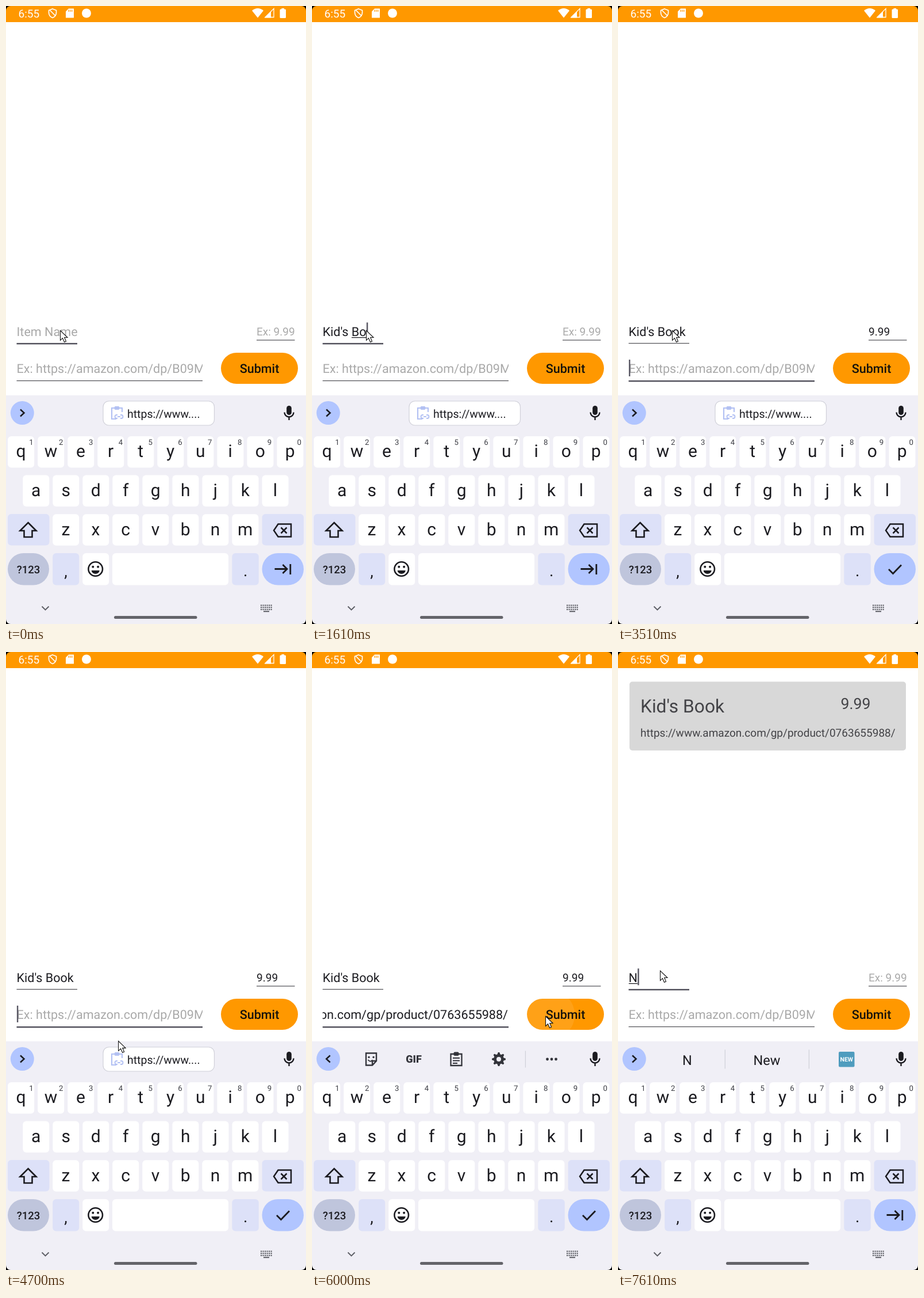
Recreate the animation shown at these times as an HTML page with a canvas. Size 522x1073 px, loop 8 s.

```html
<!DOCTYPE html>
<html lang="en">
<head>
<meta charset="utf-8">
<title>Wish list form</title>
<style>
html, body { margin: 0; width: 100%; height: 100%; overflow: hidden; background: #fff; }
canvas { display: block; width: 522px; height: 1073px; }
</style>
</head>
<body>
<canvas id="stage" width="522" height="1073"></canvas>
<script>
const c = document.getElementById('stage').getContext('2d');
const LOOP = 8000;
const INK = '#1b1b20', HINT = '#a9a9a9', ORANGE = '#ff9800', BLUE = '#b1c5ff', PALE = '#dde1f8';
const LINK = 'https://www.amazon.com/gp/product/0763655988/';
const BIG = 21.57, SMALL = 19.03;

// Time from which each value holds.
const NAME = [[0, ''], [810, 'K'], [910, 'Ki'], [1010, 'Kid'], [1110, "Kid'"], [1210, "Kid's"],
  [1310, "Kid's "], [1510, "Kid's B"], [1610, "Kid's Bo"], [1680, "Kid's Boo"],
  [1820, "Kid's Book"], [6070, ''], [7540, 'N']];
const PRICE = [[0, ''], [2830, '9'], [3100, '9.'], [3300, '9.9'], [3370, '9.99'], [6070, '']];
const URL_TEXT = [[0, ''], [5000, LINK], [6070, '']];
const FOCUS = [[0, 'name'], [1960, 'price'], [3510, 'url'], [6710, 'name']];
const BLINK = [[0, 0], [70, 1], [610, 0], [810, 1], [2430, 0], [2830, 1], [4010, 0], [4510, 1],
  [5500, 0], [6010, 1], [6500, 0], [6710, 1], [7210, 0], [7540, 1]];
const STRIP = [[0, 'chip'], [5000, 'tools'], [7540, 'words']];
const MOUSE = [[0, 94, 563], [3780, 94, 563], [3910, 432, 491], [4100, 414, 564], [4440, 414, 564],
  [4700, 195, 675], [4920, 222, 693], [5310, 222, 693], [5820, 406, 632], [6150, 406, 632],
  [6420, 100, 542], [6550, 73, 553]];

const clamp = v => Math.max(0, Math.min(1, v));
const at = (list, t) => list.filter(e => e[0] <= t).pop()[1];

function mouseAt(t) {
  const i = MOUSE.findIndex(k => k[0] > t);
  if (i < 0) return MOUSE[MOUSE.length - 1].slice(1);
  const [t0, x0, y0] = MOUSE[i - 1], [t1, x1, y1] = MOUSE[i];
  const p = (t - t0) / (t1 - t0);
  return [x0 + (x1 - x0) * p, y0 + (y1 - y0) * p];
}

function rect(x, y, w, h, fill, r = 0) {
  c.beginPath();
  c.roundRect(x, y, w, h, r);
  c.fillStyle = fill;
  c.fill();
}

function dot(x, y, r, fill) {
  c.beginPath();
  c.arc(x, y, r, 0, 7);
  c.fillStyle = fill;
  c.fill();
}

function text(s, x, y, size, fill = INK, align = 'left', weight = 400) {
  c.font = `${weight} ${size}px Roboto, sans-serif`;
  c.textAlign = align;
  c.fillStyle = fill;
  c.fillText(s, x, y);
}

function line(d, color = INK, width = 2.6, fill) {
  const p = new Path2D(d);
  if (fill) { c.fillStyle = fill; c.fill(p); }
  c.strokeStyle = color;
  c.lineWidth = width;
  c.stroke(p);
}

function shape(d, fill) {
  c.fillStyle = fill;
  c.fill(new Path2D(d));
}

function statusBar() {
  rect(0, 0, 522, 28, ORANGE);
  text('6:55', 21.5, 19.5, SMALL, '#fff');
  line('M81 5L87.500 7.500V12Q87 18 81 20.500Q75 18 74.500 12V7.500ZM76 7L86 17', '#fff', 1.7);
  shape('M109 4.500H118V20.500H104V9.500Z', '#fff');
  for (let i = 0; i < 3; i++) rect(108.500 + i * 2.800, 6.500, 1.300, 3.500, ORANGE);
  dot(140, 12.5, 8, '#fff');
  shape('M438 20.500L428 8Q438 0 448 8Z', '#fff');
  line('M451 19.500L466 4.500V19.500Z', '#fff', 1.3);
  shape('M450 20.500L461 9.500V20.500Z', '#fff');
  rect(476.5, 5.500, 10.500, 15.500, '#fff', 1.5);
  rect(479.5, 4, 4.500, 2, '#fff');
}

function card(t) {
  c.globalAlpha = t < 6070 ? 0 : clamp((t - 6010) / 120);
  rect(20, 51.5, 481, 119.5, '#d8d8d8', 5);
  text("Kid's Book", 39, 104.5, 31.72, '#434347');
  text('9.99', 387.5, 99, 26.64, '#434347');
  text(LINK, 39, 147, SMALL, '#434347');
  c.globalAlpha = 1;
}

// One line edit box: hint or value, underline, caret.
function field(f, value, focus, caret) {
  rect(f.x, f.line, f.w, focus ? 2.5 : 1.3, focus ? '#55545f' : '#55555a');
  c.save();
  c.beginPath();
  c.rect(f.x, f.base - 30, f.w, 42);
  c.clip();
  c.font = `400 ${f.size}px Roboto, sans-serif`;
  const width = c.measureText(value).width;
  const x = f.x - Math.max(0, width - f.w + 1);
  text(value || f.hint, x, f.base, f.size, value ? INK : HINT);
  if (f.compose && focus && value) {
    const start = value.lastIndexOf(' ') + 1;
    const left = x + c.measureText(value.slice(0, start)).width;
    rect(left, f.base + 2, x + width - left, 1.3, INK);
  }
  if (focus && caret) rect(Math.min(x + width + 0.3, f.x + f.w - 2.5), f.top, 2.5, f.tall, '#5a5965');
  c.restore();
}

const nameBox = { x: 18.5, w: 105.5, base: 573, line: 585, top: 549.5, tall: 29, size: BIG, hint: 'Item Name', compose: true };
const priceBox = { x: 436, w: 66.5, base: 572, line: 579.5, top: 551, tall: 26, size: SMALL, hint: 'Ex: 9.99' };
const urlBox = { x: 18.5, w: 323.5, base: 637, line: 650, top: 614, tall: 29, size: BIG, hint: 'Ex: https://amazon.com/dp/B09M' };

function form(t) {
  const focus = at(FOCUS, t), caret = at(BLINK, t);
  field(nameBox, at(NAME, t), focus === 'name', caret);
  field(priceBox, at(PRICE, t), focus === 'price', caret);
  field(urlBox, at(URL_TEXT, t), focus === 'url', caret);
  rect(374, 602, 134, 54, ORANGE, 27);
  if (t > 5930 && t < 6750) {
    c.save();
    c.clip();
    c.globalAlpha = 0.09 * clamp((6750 - t) / 350);
    dot(407 + 34 * clamp((t - 5930) / 320), 630, 15 + 125 * clamp((t - 5930) / 320), '#fff');
    c.restore();
  }
  text('Submit', 441, 637, BIG, '#15120c', 'center', 500);
}

function clipboard(x, y, color) {
  line(`M${x} ${y}h19v20h-19z`, color, 2.3);
  rect(x + 5, y - 3.5, 9, 6.5, color, 2);
}

function gear(x, y) {
  c.beginPath();
  for (let i = 0; i < 32; i++) {
    const r = i % 4 < 2 ? 12 : 8.8, a = (i - 0.5) * Math.PI / 16;
    c.lineTo(x + r * Math.cos(a), y + r * Math.sin(a));
  }
  c.fillStyle = '#33343b';
  c.fill();
  dot(x, y, 4, '#f0eff6');
}

function strip(mode) {
  const grey = '#33343b', rule = '#cfd0d8';
  dot(28.3, 706.5, 20.5, BLUE);
  line(mode === 'tools' ? 'M31.500 700.500L25 706.500L31.500 712.500' : 'M25 700.500L31.500 706.500L25 712.500', INK, 2.5);
  if (mode === 'chip') {
    rect(169, 686, 193.5, 42, '#fff', 10);
    c.strokeStyle = '#d0d0d9';
    c.lineWidth = 1.2;
    c.stroke();
    line('M192 717H184V698H202V705', '#b3c1f3', 2.2);
    rect(188.5, 695, 9, 6, '#b3c1f3', 2);
    line('M194 710H192.500A3 3 0 0 0 192.500 716H194M199 710H200.500A3 3 0 0 1 200.500 716H199M194 713H199', '#b3c1f3', 1.8);
    text('https://www....', 211, 715, 19.5);
  } else if (mode === 'tools') {
    line('M94 696.500H112V710L105 717.500H94ZM112 710H105V717', grey, 2.4);
    dot(99, 703.5, 1.7, grey);
    dot(107, 703.5, 1.7, grey);
    line('M97.500 708Q101.500 713 105.500 708.500', grey, 2);
    text('GIF', 177, 713, 18, grey, 'center', 900);
    clipboard(241.5, 698, grey);
    line('M245 705h12M245 709.500h12M245 714h8', grey, 1.8);
    gear(325, 707);
    rect(370.8, 692.5, 1.2, 29, rule);
    for (let i = 0; i < 3; i++) dot(409.5 + i * 7.5, 707, 2.4, grey);
  } else {
    text('N', 120.5, 716.5, 23.5, INK, 'center');
    text('New', 259, 716.5, 23.5, INK, 'center');
    rect(185.7, 690.5, 1.2, 33, rule);
    rect(331.8, 690.5, 1.2, 33, rule);
    rect(384, 694, 27.5, 26.5, '#4f9cbe', 2);
    text('NEW', 397.8, 711, 10.5, '#fff', 'center', 700);
  }
  rect(488.2, 694, 8.6, 16, INK, 4.3);
  line('M484.500 705.500A8 8 0 0 0 500.500 705.500M492.500 713.500V719', INK, 2.4);
}

function keyRow(letters, x, y, caps) {
  [...letters].forEach((ch, i) => {
    const left = x + i * 52.03;
    rect(left, y, 46, 54.5, '#fff', 6);
    text(caps ? ch.toUpperCase() : ch, left + 22.8, y + 36.3, 30, INK, 'center');
  });
}

function keyboard(t) {
  const caps = t >= 1310 && t < 1510;
  const done = t >= 2290 && t < 6750;
  rect(0, 676, 522, 397, '#f0eff6');
  strip(at(STRIP, t));
  keyRow('qwertyuiop', 3.2, 747, caps);
  [...'1234567890'].forEach((n, i) => text(n, 44 + i * 51.8, 762, 13.2, '#3c3d44', 'center'));
  keyRow('asdfghjkl', 29.3, 814.5, caps);
  keyRow('zxcvbnm', 81.2, 882.3, caps);

  rect(3, 882, 72.500, 54.500, PALE, 6);
  line('M38.500 897L52.500 911H45.500V922H31.500V911H24.500Z', INK, 2.6, caps ? INK : null);
  rect(445.500, 882, 72.500, 54.500, PALE, 6);
  line('M473.500 899.500H496V921.500H473.500L466 910.500ZM478.500 905.500L488.500 915.500M488.500 905.500L478.500 915.500', INK, 2.5);

  rect(3, 950, 72, 55.5, '#bfc5dc', 27.7);
  text('?123', 39, 985, 18.5, INK, 'center', 500);
  rect(81.2, 950, 46, 55.5, PALE, 6);
  text(',', 104, 991, 28, INK, 'center');
  rect(133.2, 950, 46, 55.5, '#fff', 6);
  c.beginPath();
  c.arc(155.7, 977.5, 12.3, 0, 7);
  c.lineWidth = 2.6;
  c.stroke();
  dot(151.3, 973.7, 2, INK);
  dot(160.1, 973.7, 2, INK);
  shape('M148.700 980H162.700A7 6 0 0 1 148.700 980Z', INK);
  rect(185, 950, 202, 55.5, '#fff', 6);
  rect(393.3, 950, 46.5, 55.5, PALE, 6);
  text('.', 416.8, 990, 28, INK, 'center');
  rect(445.5, 950, 72.5, 55.5, BLUE, 27.7);
  line(done ? 'M471 978L478.500 985.500L493 970.500'
    : 'M467.500 977.500H488.500M481.500 970L489 977.500L481.500 985M494.800 969V987', INK, 2.8);

  line('M62.500 1042.500L68.500 1048.500L74.500 1042.500', '#5d5e65', 1.9);
  for (let r = 0; r < 3; r++)
    for (let i = 0; i < 6; i++) rect(443 + i * 3.5, 1039.5 + r * 3.6, 2.2, 2.2, '#5d5e65');
  rect(448, 1050.2, 10, 2, '#5d5e65');
  rect(188, 1059, 144.5, 5, '#64646a', 2.5);
}

function pointer(t) {
  const [x, y] = mouseAt(t);
  c.save();
  c.translate(x + 0.5, y + 0.5);
  line('M0 0V17L4 13.200L7 20L10 18.700L7.200 12H12.500Z', '#111', 1.1, '#fff');
  c.restore();
}

function corners() {
  const r = 8;
  c.beginPath();
  c.rect(0, 0, 522, 1073);
  c.roundRect(0, 0, 522, 1073, r);
  c.fillStyle = '#000';
  c.fill('evenodd');
}

function draw() {
  const t = performance.now() % LOOP;
  c.fontKerning = 'normal';
  c.textRendering = 'geometricPrecision';
  rect(0, 0, 522, 1073, '#fff');
  statusBar();
  card(t);
  form(t);
  keyboard(t);
  pointer(t);
  corners();
  requestAnimationFrame(draw);
}
draw();
</script>
</body>
</html>
```
